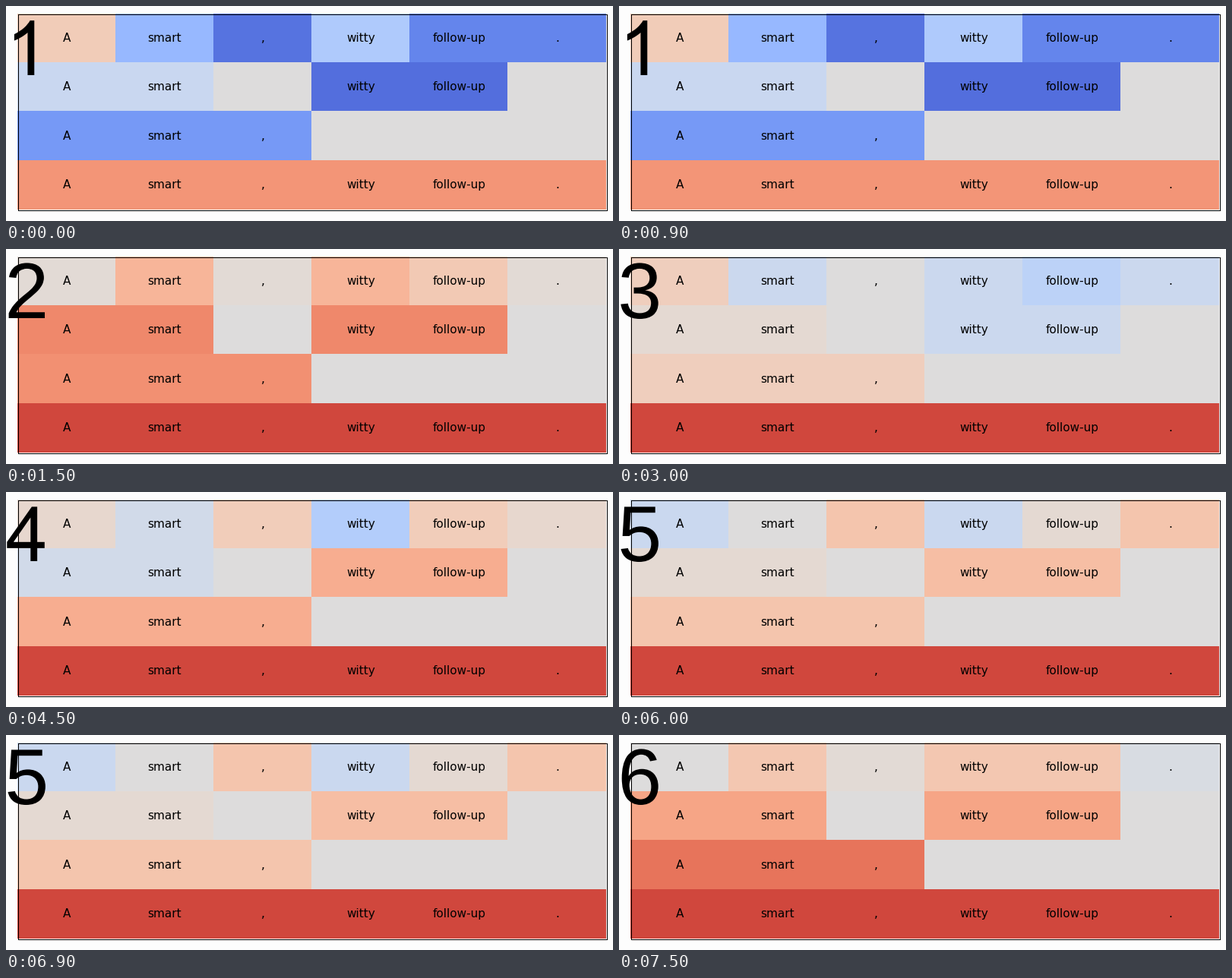
Write a matplotlib script that moves like this. It is 799 by 283 pixels and loops after 8000 ms.

```python
import numpy as np
import matplotlib.pyplot as plt
from matplotlib.animation import FuncAnimation
from matplotlib.patches import PathPatch, Rectangle
from matplotlib.path import Path
from matplotlib.textpath import TextPath
from matplotlib.transforms import Affine2D

W, H, DPI = 799, 283, 100
INTERVAL, FRAMES, HOLD = 500, 16, 3
LEFT, RIGHT, TOP, BOTTOM = 15, 790, 10, 268
CELL_W, CELL_H = (RIGHT - LEFT) / 6, 64.4
BASELINE = 91

WORDS = ["A", "smart", ",", "witty", "follow-up", "."]
# Which words each row covers.
MASKS = ["111111", "110110", "111000", "111111"]

# Per step: word scores, two phrase scores, clause score, sentence score.
STEPS = [
    ([.597, .281, .09, .35, .133, .133], (.428, .08), .185, .76),
    ([.52, .675, .52, .675, .607, .52], (.79, .79), .772, .92),
    ([.585, .435, .5, .435, .387, .435], (.53, .435), .585, .92),
    ([.54, .457, .59, .36, .59, .54], (.457, .699), .699, .92),
    ([.43, .5, .624, .43, .53, .624], (.53, .645), .624, .92),
    ([.5, .616, .52, .616, .616, .483], (.722, .722), .835, .92),
]


def score_grid(step):
    words, (first, second), clause, sentence = STEPS[step]
    return np.array([
        words,
        [first, first, .5, second, second, .5],
        [clause] * 3 + [.5] * 3,
        [sentence] * 6,
    ])


def one_path():
    """A plain footless 1, in 2048 units per em."""
    points = [(763, 0), (583, 0), (583, 1147), (518, 1085), (412, 1023),
              (307, 961), (223, 930), (223, 1104), (374, 1175), (487, 1276),
              (600, 1377), (647, 1472), (763, 1472), (763, 0)]
    M, L, Q, Z = Path.MOVETO, Path.LINETO, Path.CURVE3, Path.CLOSEPOLY
    codes = [M, L, L, Q, Q, Q, Q, L, Q, Q, Q, Q, L, Z]
    return Path(points, codes)


def four_path():
    outer = [(662, 0), (662, 351), (26, 351), (26, 516), (695, 1466),
             (842, 1466), (842, 516), (1040, 516), (1040, 351),
             (842, 351), (842, 0), (662, 0)]
    inner = [(662, 516), (662, 1177), (203, 516), (662, 516)]
    return Path.make_compound_path(Path(outer, closed=True),
                                   Path(inner, closed=True))


def digit_path(n):
    if n in (1, 4):
        path = one_path() if n == 1 else four_path()
        scale, x = 100 / 2048, 0
    else:
        path = TextPath((0, 0), str(n), size=104,
                        prop={"family": "Liberation Sans"})
        scale, x = 1, -1.6
    place = Affine2D().scale(scale, -scale).translate(x, BASELINE)
    return place.transform_path(path)


plt.rcParams["font.family"] = "DejaVu Sans"
fig = plt.figure(figsize=(W / DPI, H / DPI), dpi=DPI, facecolor="#fdfdfd")
ax = fig.add_axes([0, 0, 1, 1])
ax.axis("off")

x_edges = np.floor(LEFT + CELL_W * np.arange(7) + 1e-6)
y_edges = np.floor(TOP + CELL_H * np.arange(5))
y_edges[-1] = BOTTOM
mesh = ax.pcolormesh(x_edges, y_edges, score_grid(0), cmap="coolwarm",
                     vmin=0, vmax=1, antialiased=False, linewidth=0)
ax.set_xlim(0, W)
ax.set_ylim(H, 0)

ax.add_patch(Rectangle((LEFT + .5, TOP + .5), RIGHT - LEFT, BOTTOM - TOP,
                       fill=False, edgecolor="black", linewidth=.72,
                       antialiased=False, zorder=3))

for row, mask in enumerate(MASKS):
    for col, word in enumerate(WORDS):
        if mask[col] == "1":
            ax.text(LEFT + CELL_W * (col + .5), TOP + CELL_H * (row + .5),
                    word, size=11, ha="center", va="center", zorder=4)

digits = [digit_path(n + 1) for n in range(len(STEPS))]
counter = PathPatch(digits[0], facecolor="black", linewidth=0, zorder=5)
ax.add_patch(counter)


def update(frame):
    step = frame // HOLD
    mesh.set_array(score_grid(step))
    counter.set_path(digits[step])
    return mesh, counter


anim = FuncAnimation(fig, update, frames=FRAMES, interval=INTERVAL,
                     repeat=True, repeat_delay=0, blit=False)
plt.show()
```
